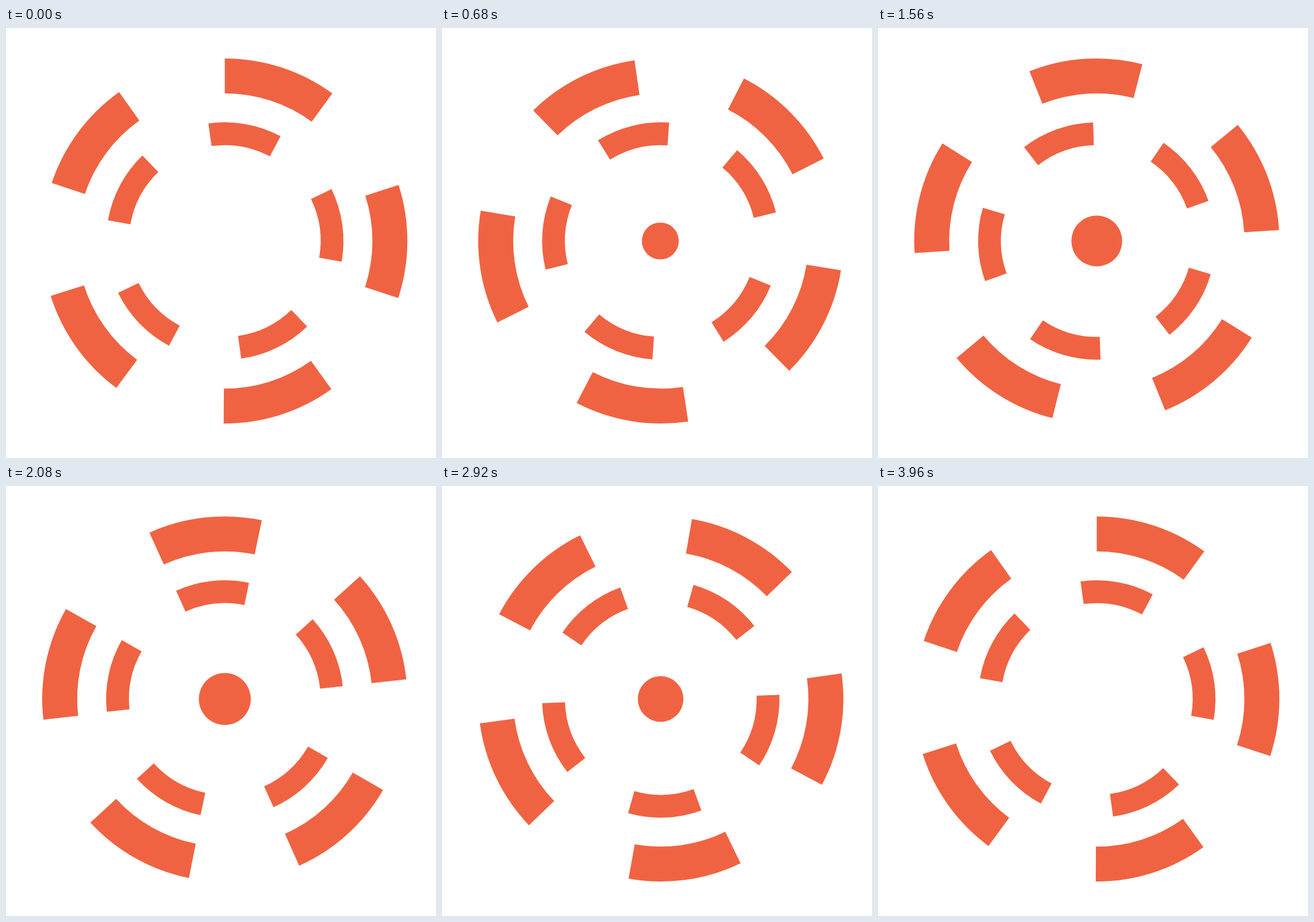
Recreate the animation shown at these times as an HTML page with a canvas. Size 748 by 748 pixels, loop 4 s.

```html
<!DOCTYPE html>
<html lang="en">
<head>
<meta charset="utf-8">
<title>Rotating rings</title>
<style>
  html, body { margin: 0; width: 100%; height: 100%; overflow: hidden; background: #fff; }
  canvas { display: block; }
</style>
</head>
<body>
<canvas id="stage" width="748" height="748"></canvas>
<script>
const ctx = document.getElementById('stage').getContext('2d');
const CENTER = { x: 380.6, y: 370.5 };
const LOOP = 4000, STEP = 40;   // ms
const LAST = 238;               // length of the motion in ticks of 1/60 s
const RAD = Math.PI / 180;

// Ease through (0,0) (x1,0) (x2,1) (1,1), with x solved by bisection.
function ease(x1, x2, x) {
  let low = 0, high = 1;
  for (let i = 0; i < 30; i++) {
    const s = (low + high) / 2, u = 1 - s;
    if (3 * u * u * s * x1 + 3 * u * s * s * x2 + s * s * s < x) low = s;
    else high = s;
  }
  return low * low * (3 - 2 * low);
}

// Five dashes, clockwise from `start` degrees past twelve o'clock.
function ring(radius, width, start, dash) {
  ctx.lineWidth = width;
  for (let i = 0; i < 5; i++) {
    const from = start - 90 + i * 2 * dash;
    ctx.beginPath();
    ctx.arc(CENTER.x, CENTER.y, radius, from * RAD, (from + dash) * RAD);
    ctx.stroke();
  }
}

function dot(progress) {
  const half = 1 - Math.abs(2 * progress - 1);
  const radius = 45.2 * ease(0.1, 0.1, half);
  if (radius < 0.5) return;
  ctx.beginPath();
  ctx.arc(377.7 + 0.065 * radius, CENTER.y, radius, 0, 2 * Math.PI);
  ctx.fill();
}

function draw(time) {
  const tick = Math.floor(Math.floor((time % LOOP) / STEP) * 12 / 5);
  const progress = Math.min(tick / LAST, 1);
  ctx.clearRect(0, 0, 748, 748);
  ctx.fillStyle = ctx.strokeStyle = '#f06342';
  ring(287.2, 60.8, 360 * ease(1 / 3, 2 / 3, progress), 36.07);
  ring(186.6, 39.7, -7.95 - 360 * ease(1 / 3, 5 / 6, progress), 36);
  dot(progress);
}

const begin = performance.now();
function loop() {
  draw(performance.now() - begin);
  requestAnimationFrame(loop);
}
loop();
</script>
</body>
</html>
```
